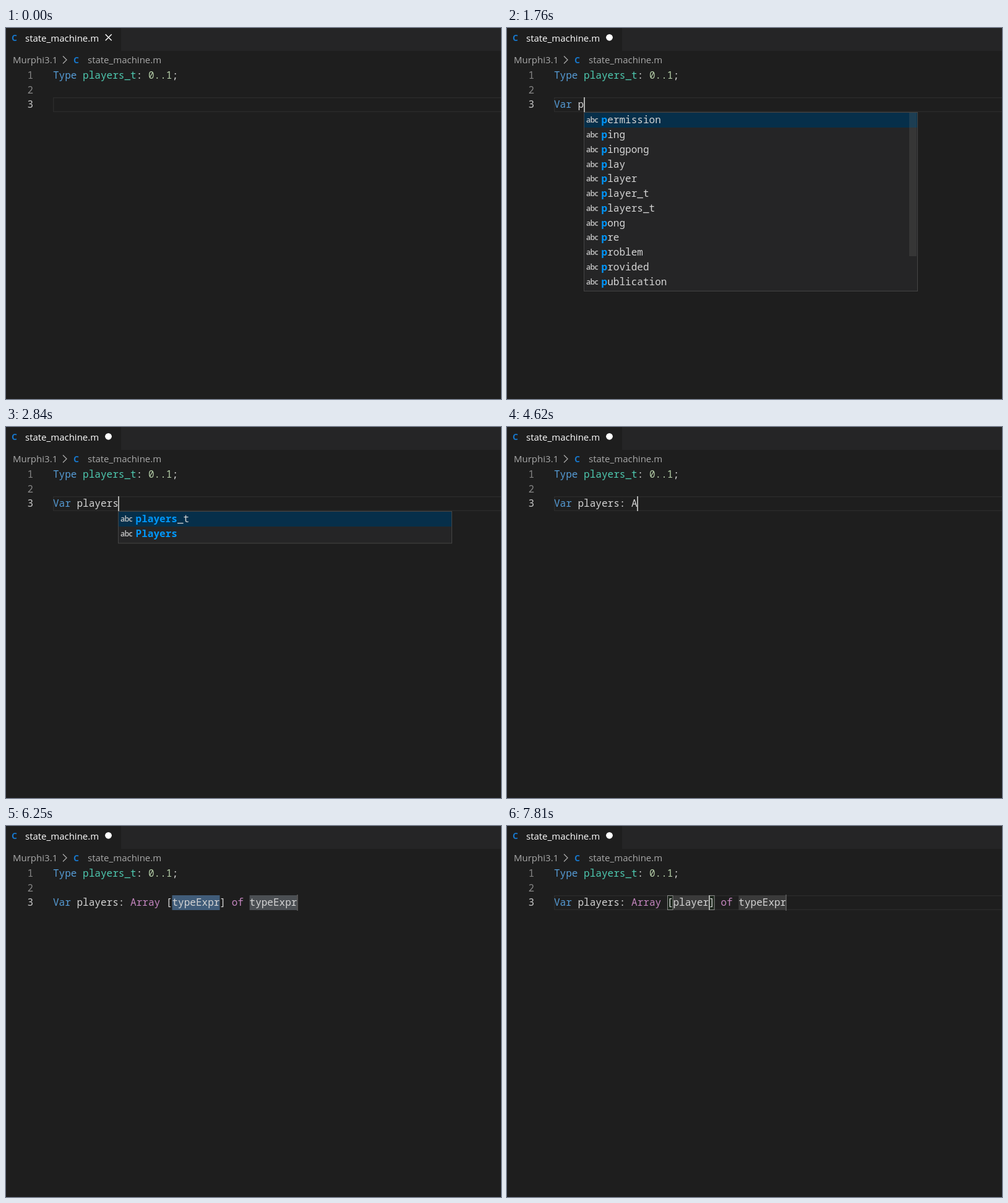
An HTML page for the animation above (8000 ms loop, 800x600 px).

```html
<!DOCTYPE html>
<html lang="en">
<head>
<meta charset="utf-8">
<title>Typing a variable declaration</title>
<style>
html, body { margin: 0; width: 100%; height: 100%; overflow: hidden; background: #1e1e1e; }
svg { display: block; }
text { white-space: pre; }
.code { font: 500 16.04px "Noto Sans Mono", "DejaVu Sans Mono", monospace; }
.ui { font: 15px "Open Sans", "Noto Sans", sans-serif; }
.icon { font: 700 14px "Open Sans", "Noto Sans", sans-serif; fill: #1775c7; }
.abc { font: 600 12.3px "Open Sans", "Noto Sans", sans-serif; fill: #c5c5c5; letter-spacing: -.7px; }
.hit { font-weight: 700; fill: #0097fb; }
</style>
</head>
<body>
<svg width="800" height="600" viewBox="0 0 800 600">
  <rect width="800" height="600" fill="#1e1e1e"/>
  <rect x="186" width="614" height="37" fill="#252526"/>
  <text class="icon" x="9" y="20.5">C</text>
  <text class="ui" x="31" y="22" fill="#fff">state_machine.m</text>
  <path id="close" d="M160.7 10.2l10 10m0-10l-10 10" stroke="#fff" stroke-width="1.4"/>
  <circle id="dirty" cx="165.5" cy="15.3" r="5.4" fill="#fff"/>
  <text class="ui" x="11" y="57" fill="#a9a9a9">Murphi3.1</text>
  <path d="M92 45.5l6 6-6 6" fill="none" stroke="#a9a9a9" stroke-width="1.3"/>
  <text class="icon" x="109" y="56.5">C</text>
  <text class="ui" x="132" y="57" fill="#a9a9a9">state_machine.m</text>
  <g class="code" text-anchor="end" fill="#858585">
    <text x="44" y="82">1</text>
    <text x="44" y="106">2</text>
    <text x="44" y="129" fill="#c6c6c6">3</text>
  </g>
  <g id="editor"></g>
</svg>
<script>
const LOOP = 8000, LEFT = 76, CHAR = 9.625, ROW = 23.75, POPUP_TOP = 136.5;
const BLUE = '#569cd6', TEAL = '#4ec9b0', PLAIN = '#d4d4d4', GREEN = '#b5cea8', PURPLE = '#c586c0';

// Suggestion lists; a leading * marks a snippet.
const V_LIST = 'Var *Var *var variable';
const P_LIST = 'permission ping pingpong play player player_t players_t pong pre problem provided publication';
const PL_LIST = 'play player player_t players_t problem publication Players';
const PLA_LIST = 'play player player_t players_t Players';
const PLAYER_LIST = 'player player_t players_t Players';
const AR_LIST = 'Array *Array *array *Assert already accuracy *assert appear';
const A_LIST = AR_LIST + ' *Alias *alias action and';
const ARRAY_LIST = 'Array *Array *array';

const typed = (time, text, list, word, pick = 0, more = {}) =>
  ({ time, text, list, word, pick, caret: text.length, ...more });
const snippet = (time, name, more = {}) =>
  ({ time, name, text: `Var players: Array [${name}] of typeExpr`, caret: 20 + name.length, colored: true, ...more });

const steps = [
  { time: 0, text: '' },
  typed(70, ''),
  typed(530, 'V'),
  typed(610, 'V', V_LIST, 'V', 1),
  typed(760, 'Va', V_LIST, 'Va', 1),
  typed(990, 'Var', V_LIST, 'Var', 1),
  typed(1220, 'Var '),
  typed(1680, 'Var p'),
  typed(1760, 'Var p', P_LIST, 'p', 0, { thumb: 232 }),
  typed(1840, 'Var pl', PL_LIST, 'pl'),
  typed(1990, 'Var pla', PLA_LIST, 'pla'),
  typed(2150, 'Var play', PLA_LIST, 'play'),
  typed(2380, 'Var playe', PLAYER_LIST, 'playe'),
  typed(2610, 'Var player', PLAYER_LIST, 'player'),
  typed(2840, 'Var players', 'players_t Players', 'players'),
  typed(3150, 'Var players:'),
  typed(3380, 'Var players: '),
  { time: 3840, text: 'Var players: ' },
  typed(4390, 'Var players: '),
  typed(4620, 'Var players: A'),
  typed(4700, 'Var players: A', A_LIST, 'A', 1, { thumb: 200 }),
  typed(4850, 'Var players: Ar', AR_LIST, 'Ar', 1),
  typed(5020, 'Var players: Arr', ARRAY_LIST, 'Arr', 1),
  typed(5090, 'Var players: Arra', ARRAY_LIST, 'Arra', 1),
  snippet(5640, 'typeExpr', { selected: true, colored: false }),
  snippet(5790, 'typeExpr', { selected: true }),
  snippet(6250, 'typeExpr', { selected: true, caret: undefined }),
  snippet(6800, 'p', { unmatched: true }),
  snippet(6880, 'p'),
  snippet(7030, 'pl'),
  snippet(7190, 'pla'),
  snippet(7350, 'play'),
  snippet(7660, 'playe'),
  snippet(7810, 'player')
];

const colX = col => LEFT + col * CHAR;
const rect = (x, y, w, h, fill, extra = '') =>
  `<rect x="${x}" y="${y}" width="${w}" height="${h}" fill="${fill}" ${extra}/>`;
const span = (text, fill) => `<tspan fill="${fill}">${text}</tspan>`;
const line = (y, spans) => `<text class="code" x="${LEFT}" y="${y}">${spans}</text>`;

function paint(text, colored) {
  return text.split(/\b/).map(part => {
    if (part === 'Var') return span(part, BLUE);
    return span(part, colored && /^(Array|of)$/.test(part) ? PURPLE : PLAIN);
  }).join('');
}

// Highlights the typed letters, in order, within a suggestion.
function matchLabel(label, word) {
  let next = 0;
  return [...label].map(ch => {
    const hit = next < word.length && ch.toLowerCase() === word[next].toLowerCase();
    if (hit) next++;
    return `<tspan class="${hit ? 'hit' : ''}">${ch}</tspan>`;
  }).join('');
}

function popup({ caret, list, word, pick, thumb }) {
  const x = Math.floor(colX(caret)) + .5, items = list.split(' ');
  const rowTop = i => Math.ceil(POPUP_TOP + .5 + i * ROW);
  let out = rect(x, POPUP_TOP, 539, items.length * ROW + 4, '#252526', 'stroke="#454545"');
  out += rect(x + .5, rowTop(pick), 538, 24, '#062f4a');
  items.forEach((item, i) => {
    const top = rowTop(i), base = top + 17;
    const label = item.replace('*', '');
    if (item !== label) {
      out += `<path d="M${x + 6} ${top + 19}v-15h15.5v15" fill="none" stroke="#c5c5c5" stroke-width="1.6"/>`
        + `<path d="M${x + 5} ${top + 20}h17.5" stroke="#c5c5c5" stroke-width="1.6" stroke-dasharray="2 1.2"/>`
        + `<text class="code" x="${x + 525.5}" y="${base}" text-anchor="end" fill="#969696">${label}</text>`;
    } else {
      out += `<text class="abc" x="${x + 3.5}" y="${base - 1}">abc</text>`;
    }
    out += `<text class="code" x="${x + 28}" y="${base}" fill="${PLAIN}">${matchLabel(label, word)}</text>`;
  });
  if (thumb) out += rect(x + 525.5, POPUP_TOP + .5, 12, thumb, 'rgba(121,121,121,.2)');
  return out;
}

function placeholders({ name, text, selected, unmatched }) {
  const mark = (col, length, fill) => rect(colX(col), 112, length * CHAR, 24, fill);
  const end = 20 + name.length;
  let out = mark(20, name.length, selected ? '#405c79' : '#3a3a3a');
  out += mark(text.length - 8, 8, selected ? '#4b4f53' : '#3a3a3a');
  out += rect(Math.round(colX(text.length)) - 1, 111, 2, 26, '#525252');
  if (!selected && !unmatched) {
    for (const col of [19, end]) {
      out += rect(Math.round(colX(col)) + .5, 112.5, 8.6, 23, 'rgba(0,100,0,.1)', 'stroke="#888"');
    }
  }
  return out;
}

function draw(step) {
  let out = step.selected ? '' : rect(LEFT + .75, 112.75, 740, 22.5, 'none', 'stroke="#2a2a2a" stroke-width="1.5"');
  if (step.name) out += placeholders(step);
  out += line(82, span('Type ', BLUE) + span('players_t', TEAL) + span(': ', PLAIN) + span('0..1', GREEN) + span(';', PLAIN));
  out += line(129, paint(step.text, step.colored));
  if (step.caret !== undefined) out += rect(Math.floor(colX(step.caret)), 112, 2, 24, '#aeafad');
  if (step.list) out += popup(step);
  document.getElementById('editor').innerHTML = out;
  document.getElementById('close').style.display = step.time < 530 ? '' : 'none';
  document.getElementById('dirty').style.display = step.time < 530 ? 'none' : '';
}

const start = performance.now();
let shown;
function tick() {
  const time = (performance.now() - start) % LOOP;
  const step = steps.findLast(s => s.time <= time) || steps[0];
  if (step !== shown) draw(shown = step);
  requestAnimationFrame(tick);
}
tick();
</script>
</body>
</html>
```
